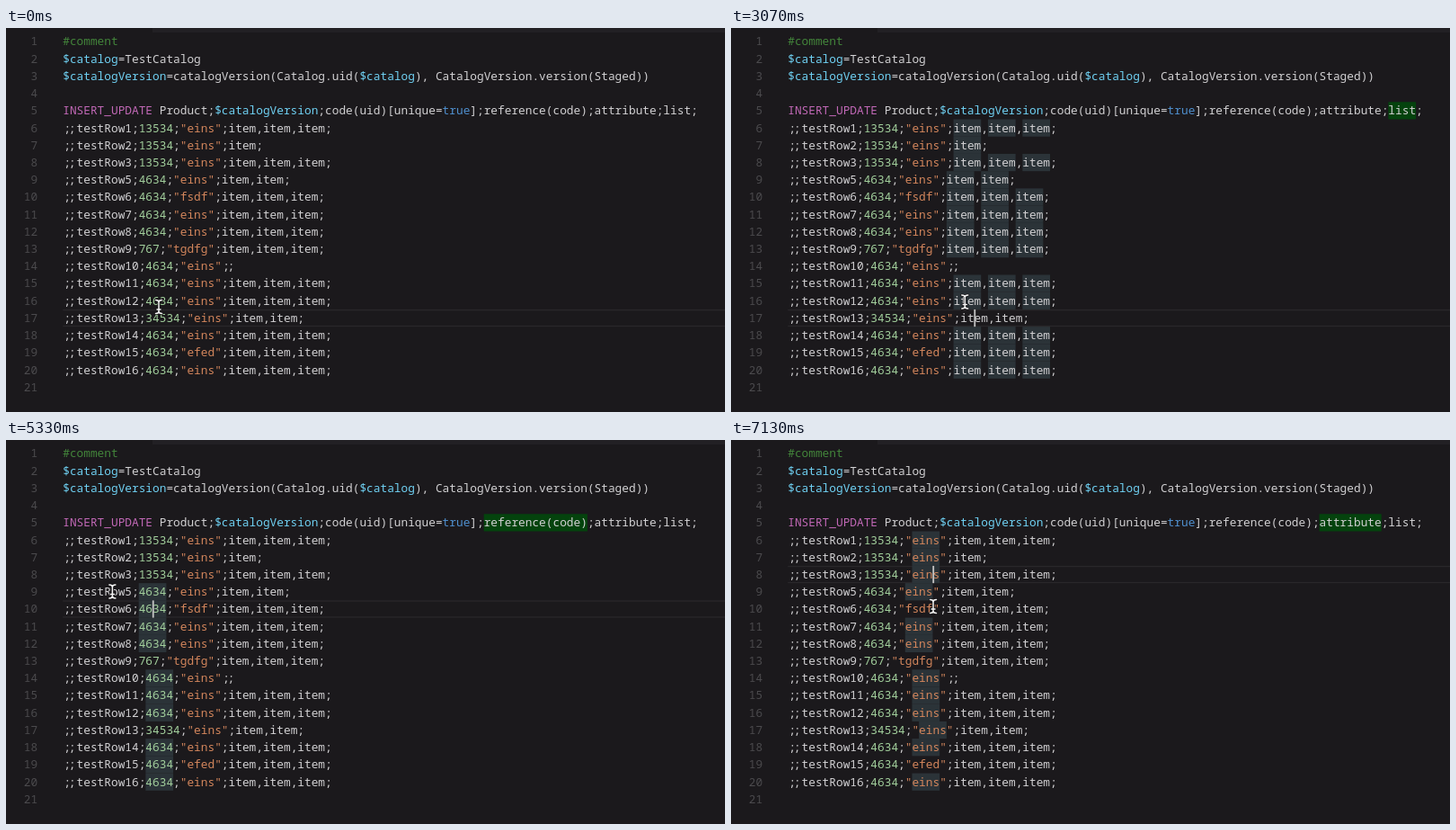
These frames come from a looping animation (800x427 px, 7.19 s). An HTML page with a canvas:

```html
<!DOCTYPE html>
<html lang="en">
<head>
<meta charset="utf-8">
<style>
html, body { margin: 0; width: 100%; height: 100%; overflow: hidden; background: #1b191c; }
canvas { display: block; }
</style>
</head>
<body>
<canvas id="stage" width="800" height="427"></canvas>
<script>
const ctx = document.getElementById('stage').getContext('2d');
const LOOP = 7190, STEP = 1000 / 15;
const LEFT = 63.2, CELL = 7.68, TOP = 5.4, ROW = 19.22;
const FONT = '12.8px "Fira Code", "Noto Sans Mono", "DejaVu Sans Mono", monospace';

const lines = `#comment
$catalog=TestCatalog
$catalogVersion=catalogVersion(Catalog.uid($catalog), CatalogVersion.version(Staged))

INSERT_UPDATE Product;$catalogVersion;code(uid)[unique=true];reference(code);attribute;list;
;;testRow1;13534;"eins";item,item,item;
;;testRow2;13534;"eins";item;
;;testRow3;13534;"eins";item,item,item;
;;testRow5;4634;"eins";item,item;
;;testRow6;4634;"fsdf";item,item,item;
;;testRow7;4634;"eins";item,item,item;
;;testRow8;4634;"eins";item,item,item;
;;testRow9;767;"tgdfg";item,item,item;
;;testRow10;4634;"eins";;
;;testRow11;4634;"eins";item,item,item;
;;testRow12;4634;"eins";item,item,item;
;;testRow13;34534;"eins";item,item;
;;testRow14;4634;"eins";item,item,item;
;;testRow15;4634;"efed";item,item,item;
;;testRow16;4634;"eins";item,item,item;
`.split('\n');

const styles = [
  [/^#.*/, '#43853b'],
  [/^\$\w+/, '#6fd0f2'],
  [/^INSERT_UPDATE/, '#c168b6'],
  [/^true\b/, '#4f8fce'],
  [/^"[^"]*"/, '#d3865c'],
  [/^\d+\b/, '#a2cf9c'],
  [/^;;/, '#d2d1d3'],
  [/^(\w+|[^\w])/, '#d2d1d3']
];

// Each click places the caret, then the matching words light up a little later.
const clicks = [
  { at: 350, row: 17, col: 14, word: '34534', head: 'reference(code)' },
  { at: 2600, row: 17, col: 27, word: 'item', head: 'list', skip: 17 },
  { at: 4300, row: 10, col: 13, word: '4634', head: 'reference(code)' },
  { at: 5450, row: 9, col: 7, word: 'testRow5', head: 'code(uid)[unique=true]' },
  { at: 6730, row: 8, col: 21, word: 'eins', head: 'attribute' }
];
const WORD_DELAY = 250;

// time, x, y
const path = [
  [0, 170, 310], [300, 171, 321], [1500, 171.5, 322], [2200, 273, 321],
  [2900, 273, 321], [3650, 172, 190], [3750, 172, 190], [4250, 165, 185],
  [4580, 165, 185], [5100, 121, 172], [5400, 118, 168], [5650, 118, 168],
  [6000, 157, 172], [6600, 224, 150], [6830, 224, 150], [7130, 225, 185]
];

const colX = col => LEFT + col * CELL;
const rowY = row => TOP + (row - 1) * ROW;

function box(row, col, length, color) {
  ctx.fillStyle = color;
  ctx.fillRect(colX(col), rowY(row), length * CELL, ROW);
}

function drawLine(text, row) {
  const y = rowY(row) + 14;
  let col = 0;
  while (col < text.length) {
    const rest = text.slice(col);
    const [rule, color] = styles.find(s => s[0].test(rest));
    const token = rest.match(rule)[0];
    ctx.fillStyle = color;
    if (token === ';;') {
      ctx.fillText(';', colX(col) + 1.1, y);
      ctx.fillText(';', colX(col + 1) - 1.1, y);
    } else {
      ctx.fillText(token, colX(col), y);
    }
    col += token.length;
  }
}

function drawMarks(click, t) {
  box(5, lines[4].indexOf(';' + click.head + ';') + 1, click.head.length, '#04430d');
  if (t < click.at + WORD_DELAY) return;
  const match = new RegExp('\\b' + click.word + '\\b', 'g');
  lines.forEach((text, i) => {
    if (i + 1 === click.skip) return;
    for (const m of text.matchAll(match)) box(i + 1, m.index, m[0].length, '#2b3338');
  });
}

function pointerAt(t) {
  const i = path.findIndex(p => p[0] > t);
  if (i < 0) return path[path.length - 1].slice(1);
  const [a, b] = [path[i - 1], path[i]];
  const u = (t - a[0]) / (b[0] - a[0]);
  const e = u * u * (3 - 2 * u);
  return [a[1] + (b[1] - a[1]) * e, a[2] + (b[2] - a[2]) * e];
}

function drawPointer(x, y) {
  ctx.beginPath();
  for (const s of [-1, 1]) {
    ctx.moveTo(x - 3.5, y + 7.5 * s);
    ctx.quadraticCurveTo(x, y + 7.5 * s, x, y + 5 * s);
    ctx.quadraticCurveTo(x, y + 7.5 * s, x + 3.5, y + 7.5 * s);
  }
  ctx.moveTo(x, y - 6);
  ctx.lineTo(x, y + 6);
  ctx.moveTo(x - 2, y + 3);
  ctx.lineTo(x + 2, y + 3);
  ctx.lineCap = 'round';
  for (const [width, color] of [[3, '#161416'], [1.5, '#f4f4f4']]) {
    ctx.lineWidth = width;
    ctx.strokeStyle = color;
    ctx.stroke();
  }
}

function draw(t) {
  const click = clicks.filter(c => c.at <= t).pop();
  const current = click ? click.row : 17;

  ctx.fillStyle = '#1b191c';
  ctx.fillRect(0, 0, 800, 427);
  ctx.fillStyle = '#222024';
  ctx.fillRect(163, 0, 637, 5);

  ctx.fillStyle = '#29272a';
  ctx.fillRect(LEFT, rowY(current), 800, 1.3);
  ctx.fillRect(LEFT, rowY(current + 1) - 1.3, 800, 1.3);

  if (click) drawMarks(click, t);

  ctx.font = FONT;
  ctx.textBaseline = 'alphabetic';
  lines.forEach((text, i) => {
    ctx.textAlign = 'right';
    ctx.fillStyle = '#4b4a4d';
    ctx.fillText(i + 1, 35.2, rowY(i + 1) + 14);
    ctx.textAlign = 'left';
    drawLine(text, i + 1);
  });

  if (click && (t - click.at) % 1000 < 500) {
    ctx.fillStyle = '#c4c4c4';
    ctx.fillRect(colX(click.col) - 0.2, rowY(click.row), 1.8, ROW);
  }
  drawPointer(...pointerAt(t));
}

const start = performance.now();
function frame() {
  const t = (performance.now() - start) % LOOP;
  draw(Math.floor((t + 5) / STEP) * STEP);
  requestAnimationFrame(frame);
}
frame();
</script>
</body>
</html>
```
